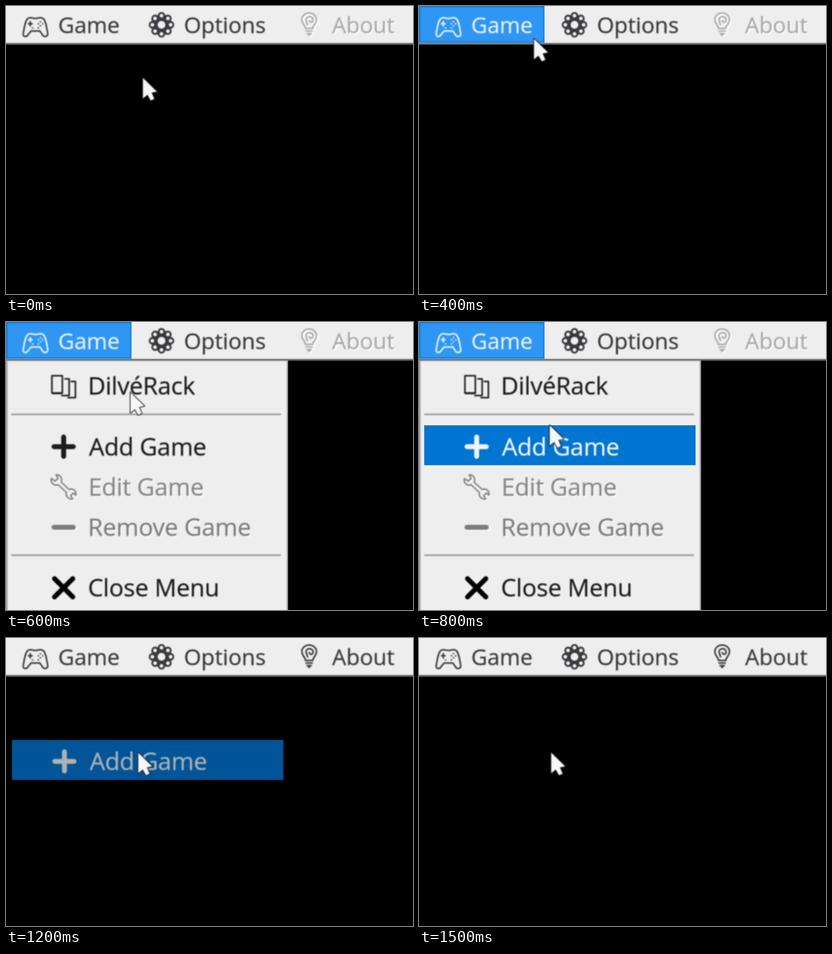
An HTML page for the animation above (1.6 s loop, 780 px wide and 552 px high).

```html
<!DOCTYPE html>
<html lang="en">
<head>
<meta charset="utf-8">
<title>Game menu</title>
<style>
  html, body { margin: 0; width: 100%; height: 100%; overflow: hidden; background: #000; }
  svg { display: block; width: 780px; height: 552px; }
  text { font-family: "Open Sans", "Noto Sans", sans-serif; font-size: 46.5px; letter-spacing: -.3px; fill: currentColor; stroke: currentColor; stroke-width: .4; }
  .bar text { font-size: 42.5px; letter-spacing: 0; }
  .line { fill: none; stroke: currentColor; stroke-width: 3; stroke-linejoin: round; stroke-linecap: round; }
  .bold { fill: none; stroke: currentColor; stroke-width: 9.5; stroke-linecap: round; }
  .soft { filter: blur(.8px); }
</style>
</head>
<body>
<svg viewBox="0 0 780 552">
  <defs>
    <g id="about" class="bar">
      <path class="line" d="M574 43C574 37 567 34 567 26A14 12.500 0 0 1 595 26C595 34 588 37 588 43ZM575 48H587M577 53H585M580 56H582M578 36L575 27C575 20 584 18 588 24C590 31 584 34 581 28"/>
      <text x="625" y="51.500">About</text>
    </g>
    <g id="edit">
      <path class="line" d="M96 293L100 300L94 305L87 300C85 308 92 315 100 312L116 327C114 335 121 341 128 339L124 333L129 328L134 332C136 324 128 318 121 321L106 307C109 299 103 292 96 293Z"/>
      <text x="158" y="332.500">Edit Game</text>
    </g>
    <g id="remove">
      <path class="bold" d="M92 393.500H129"/>
      <text x="157" y="409.500">Remove Game</text>
    </g>
    <g id="add">
      <path class="bold" d="M92 239H129M110.500 220.500V257.500"/>
      <text x="159" y="255.500">Add Game</text>
    </g>
    <g id="hot" color="#fff">
      <rect x="10" y="198" width="520" height="76.500" fill="#0075d1"/>
      <use href="#add" class="soft" color="#f0f4fa"/>
    </g>
  </defs>

  <rect width="780" height="552"/>

  <g class="bar">
    <rect width="780" height="71" fill="#eee"/>
    <rect class="soft" x="-4" y="70.500" width="788" height="3" fill="#a0a0a0"/>
    <g id="hover">
      <rect width="240.500" height="70.500" fill="#1280de"/>
      <rect class="soft" x="3" y="3" width="235" height="65" fill="#2f96f4"/>
    </g>
    <g id="game" class="soft">
      <path class="line" stroke-width="3.500" d="M44 23C48 21 52 24 56.500 24S64 21 69 23C76 24 78 42 80 53C80 60 72 60 69 54L65 48H48L43 54C40 60 32 60 33 53C35 42 37 24 44 23ZM43 34H50M46.500 30V38M66 30V30M66 38V38M62 34V34M70 34V34M51 42V42M62 42V42"/>
      <text x="100" y="51.500">Game</text>
    </g>
    <g class="soft" color="#38383c">
      <g fill="none" stroke-linecap="round">
        <circle cx="298" cy="36" r="17" pathLength="8" stroke="#38383c" stroke-width="15" stroke-dasharray="0 1"/>
        <circle cx="298" cy="36" r="17.500" pathLength="8" stroke="#eee" stroke-width="7" stroke-dasharray="0 1"/>
        <circle cx="298" cy="36" r="9.500" stroke="#38383c" stroke-width="4" fill="#eee"/>
      </g>
      <text x="341" y="51.500">Options</text>
    </g>
    <g id="aboutOff" class="soft">
      <use href="#about" x="2.500" y="2.500" color="#fff"/>
      <use href="#about" color="#a9a9a9"/>
    </g>
    <use id="aboutOn" href="#about" class="soft" color="#3c3c3e"/>
  </g>

  <g id="menu">
    <rect y="73.500" width="540.500" height="479" fill="#a0a0a4"/>
    <rect class="soft" x="3" y="75" width="535" height="484" fill="#eee"/>
    <path class="soft" d="M10 177H527M10 447H527" stroke="#989898" stroke-width="3"/>
    <g class="soft" color="#1c1c20">
      <path class="line" d="M113 109H121V141H107M125 114H133V145H119" stroke="#808084"/>
      <path class="line" d="M88 103H108V136H88ZM89 137H107"/>
      <text x="157" y="138.500">DilvéRack</text>
      <use href="#add"/>
      <text x="157" y="525.500">Close Menu</text>
      <path class="bold" d="M93 492L128 527M128 492L93 527" color="#000" stroke-width="10"/>
    </g>
    <g class="soft" color="#fff">
      <use href="#edit" x="2" y="2"/>
      <use href="#remove" x="2" y="2"/>
    </g>
    <g class="soft" color="#868686">
      <use href="#edit"/>
      <use href="#remove" color="#7c7c7c"/>
    </g>
    <use id="picked" href="#hot"/>
  </g>

  <use id="ghost" href="#hot" x="1.500" y="-2.500"/>

  <path id="cursor" class="soft" d="M.5 0V39L9 32L15.500 43L22 40L17 28L27 26Z" fill="#f7f7fa" stroke="#181818" stroke-width="3" paint-order="stroke" stroke-linejoin="round"/>
</svg>
<script>
const STEP = 100, STEPS = 16;
const el = id => document.getElementById(id);
const show = (id, on) => el(id).style.display = on ? "" : "none";
const fade = (id, value) => { show(id, value > 0); el(id).style.opacity = value; };

// pointer stops: step, x, y
const stops = [
  [0, 262, 138], [1, 254, 124], [2, 236, 92], [3, 222, 67], [4, 220, 63],
  [6, 238, 135], [7, 245, 172], [8, 250, 198], [9, 252, 211], [10, 253, 217],
  [11, 253, 218], [12, 253, 220]
];
const HOVER = 3, MENU_OPEN = 5, PICK = 8, MENU_SHUT = 12;

function draw(step) {
  const [, x, y] = stops.findLast(s => s[0] <= step);
  const open = step >= MENU_OPEN && step < MENU_SHUT;
  const hover = step >= HOVER && step < MENU_SHUT;

  el("cursor").setAttribute("transform", `translate(${x} ${y})`);
  show("hover", hover);
  el("game").style.color = hover ? "#e6f1fc" : "#3c3c3e";
  fade("menu", open ? (step === MENU_OPEN ? 0.61 : 1) : 0);
  show("picked", step >= PICK);
  fade("ghost", step < MENU_SHUT ? 0 : Math.max(0, 0.72 - 0.36 * (step - MENU_SHUT)));
  show("aboutOn", step >= MENU_SHUT);
  show("aboutOff", step < MENU_SHUT);
}

const start = performance.now();
let last = -1;
function tick() {
  const step = Math.floor((performance.now() - start) / STEP) % STEPS;
  if (step !== last) draw(last = step);
  requestAnimationFrame(tick);
}
tick();
</script>
</body>
</html>
```
